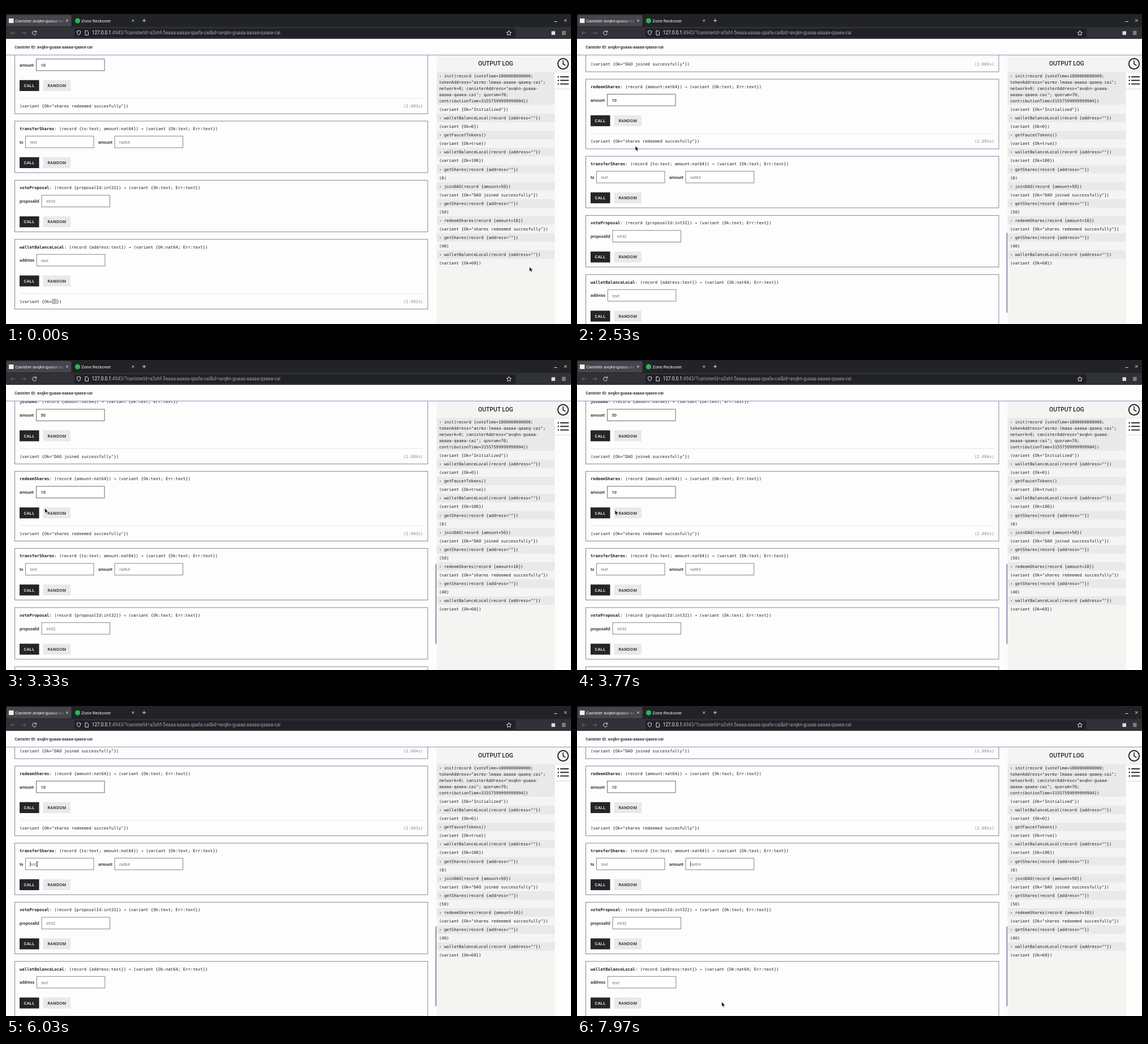
Animation of 998 by 561 pixels, one loop 8 s. Source, as an HTML page:

```html
<!DOCTYPE html>
<html lang="en">
<head>
<meta charset="utf-8">
<title>Canister console</title>
<style>
html, body { margin: 0; width: 998px; height: 561px; overflow: hidden; background: #fdfdfc; }
svg { display: block; }
text { font: 7.28px Roboto, sans-serif; fill: #222; white-space: pre; }
.m { font-family: "DejaVu Sans Mono", monospace; }
.b { font-weight: 500; }
.caps { font-weight: 500; letter-spacing: .36px; text-anchor: middle; }
.tab { font-size: 7.8px; fill: #f4f4f8; }
.url { font-size: 8.2px; fill: #a2a2aa; }
.hint { fill: #757575; }
.time { fill: #8a8a8a; text-anchor: end; }
.icon { fill: none; stroke: #e6e6ec; stroke-width: 1; }
</style>
</head>
<body>
<svg id="stage" width="998" height="561" viewBox="0 0 998 561"></svg>
<script>
const rect = (x, y, w, h, fill, extra = '') =>
  `<rect x="${x}" y="${y}" width="${w}" height="${h}" fill="${fill}" ${extra}/>`;
// Text is placed by its vertical middle.
const text = (x, mid, s, cls = '', extra = '') =>
  `<text x="${x}" y="${mid + 2.6}" class="${cls}" ${extra}>${s}</text>`;
const icon = (d, extra = '') => `<path class="icon" d="${d}" ${extra}/>`;

function card(top, name, args, result, fields, reply, time) {
  let s = rect(15.5, top, 729.5, reply ? 123 : 91, '#fdfdfd', 'stroke="#8585a0"');
  s += text(24, top + 13.3, `<tspan font-weight="700">${name}</tspan>: (record {${args}}) → (variant {${result}; Err:text})`, 'm');
  for (const [labelX, label, x, value] of fields) {
    const typed = value === '10' || value === '50';
    s += text(labelX, top + 37, label, 'b');
    s += rect(x, top + 26.5, 120.5, 20.5, '#fff', `stroke="${typed ? '#6c6c6c' : '#85858f'}"`);
    s += text(x + 8, top + 37.2, value, typed ? 'b' : 'hint');
  }
  s += rect(24, top + 63.7, 34.5, 19.3, '#252528') + text(41, top + 73.4, 'CALL', 'caps', 'style="fill:#fff"');
  s += rect(65.5, top + 63.7, 48.5, 19.3, '#e9e9e9') + text(89.8, top + 73.4, 'RANDOM', 'caps');
  if (reply) {
    s += rect(24, top + 95.6, 713, .7, '#dcdce4');
    s += text(24, top + 109.4, `(variant {Ok=${reply}})`, 'm') + text(737, top + 109.4, `(${time}s)`, 'm time');
  }
  return s;
}

const cards =
  card(-69, 'joinDAO', 'amount:nat64', 'Ok:text', [[24, 'amount', 53.5, '50']], '"DAO joined successfully"', '2.084') +
  card(67, 'redeemShares', 'amount:nat64', 'Ok:text', [[24, 'amount', 53.5, '10']], '"shares redeemed succesfully"', '2.083') +
  card(203, 'transferShares', 'to:text; amount:nat64', 'Ok:text', [[24, 'to', 34.5, 'text'], [163, 'amount', 192, 'nat64']]) +
  card(307.4, 'voteProposal', 'proposalId:int32', 'Ok:text', [[24, 'proposalId', 63, 'int32']]) +
  card(411.7, 'walletBalanceLocal', 'address:text', 'Ok:nat64', [[24, 'address', 54.3, 'text']], '  ', '2.092') +
  rect(81, 516.8, 8.8, 8.8, '#a9a9a9') + text(80.9, 521.1, '60', 'm', 'style="fill:#e6e6e6"');

const init = ['› init(record {voteTime=1800000000000;', 'tokenAddress="asrmz-lmaaa-aaaaa-qaaeq-cai";',
  'network=0; canisterAddress="avqkn-guaaa-', 'aaaaa-qaaea-cai"; quorum=70;', 'contributionTime=31557599999999904})'];
const balance = 'walletBalanceLocal(record {address=""})', shares = 'getShares(record {address=""})';
const log = ['(variant {Ok="Initialized"})', balance, '(variant {Ok=0})', 'getFaucetTokens()', '(variant {Ok=true})',
  balance, '(variant {Ok=100})', shares, '(0)', 'joinDAO(record {amount=50})', '(variant {Ok="DAO joined successfully"})',
  shares, '(50)', 'redeemShares(record {amount=10})', '(variant {Ok="shares redeemed succesfully"})',
  shares, '(40)', balance, '(variant {Ok=60})'];

const panel = rect(760.5, 87, 209.5, 474, '#f4f4f3') + rect(970, 87, 28, 474, '#fdfdfc') +
  rect(970, 87, 28, 29.5, '#f4f4f3') +
  text(865, 102.8, 'OUTPUT LOG', 'b', 'text-anchor="middle" style="font-size:10.4px"') +
  rect(761, 116.5, 208, 57.5, '#e9e9e9') +
  init.map((s, i) => text(765, 123.8 + i * 10.9, s, 'm')).join('') +
  log.map((s, i) => {
    const y = 182.5 + i * 15.06;
    return i % 2 ? rect(761, y - 7.5, 208, 15, '#e9e9e9') + text(765, y, '› ' + s, 'm') : text(765, y, s, 'm');
  }).join('') +
  rect(970, 116.5, 28, .8, '#deded0') + rect(970, 146, 28, .8, '#d6d6b8') +
  '<circle cx="984" cy="102" r="9.2" fill="none" stroke="#222" stroke-width="1.9"/>' +
  '<path d="M984 96v6.2l4.2 2.6" fill="none" stroke="#222" stroke-width="1.6"/>' +
  [125, 131.3, 137.6].map(y => rect(974.5, y - 1, 2.3, 2.1, '#222') + rect(979, y - 1, 15, 1.9, '#222')).join('');

const cross = (x, y, r) => icon(`M${x - r} ${y - r}l${2 * r} ${2 * r}m0 ${-2 * r}l${-2 * r} ${2 * r}`);
const dim = 'style="stroke:#6b6b73"';
const chrome = rect(0, 58, 998, 28, '#fdfdfd') + rect(0, 86, 998, 1, '#9292c4') +
  text(15.3, 72.6, 'Canister ID: avqkn-guaaa-aaaaa-qaaea-cai', 'b') +
  rect(0, 0, 998, 14, '#000') + rect(0, 14, 998, 23.5, '#222327') + rect(0, 37, 998, 21, '#313237') +
  rect(1, 16, 114.5, 20, '#45454c', 'rx="2"') +
  rect(5, 22, 8.5, 8, '#f0f0ea') + text(16.3, 26, 'Canister avqkn-guaaa-aa', 'tab', 'style="fill:url(#fade)"') +
  '<circle cx="126.5" cy="26" r="4.5" fill="#32b35a"/>' + text(133.3, 26, 'Zone Reckoner', 'tab') +
  cross(108, 25.7, 1.8) + cross(224.3, 25.7, 1.8) + cross(988.2, 25.5, 2.2) +
  icon('M241 25.7h6m-3-3v6M968.5 27.5h5') +
  icon('M16 47.5h-7.5m3-3l-3 3l3 3M27.5 47.5h7.5m-3-3l3 3l-3 3', dim) +
  icon('M53 45.4a3.5 3.5 0 1 0 .5 3.2M53.6 43.5v2.6h-2.8') +
  rect(121, 39.5, 779, 16, '#202126', 'rx="2"') +
  icon('M128.5 43.3l3.3 1.2q0 5-3.3 7q-3.3-2-3.3-7z') +
  icon('M140 43.7h3.4l2 2v5.6h-5.4z') +
  text(151.8, 47.5, '<tspan fill="#f8f8fb">127.0.0.1</tspan>:4943/?canisterId=a3shf-5eaaa-aaaaa-qaafa-cai&amp;id=avqkn-guaaa-aaaaa-qaaea-cai', 'url') +
  icon('M888.3 43.3l1.3 2.8 3 .4-2.2 2.1.5 3-2.6-1.5-2.6 1.5.5-3-2.2-2.1 3-.4z') +
  rect(963.5, 44.5, 6.5, 6.5, '#dcdce2') +
  icon('M982 45h6.5m-6.5 2.5h6.5m-6.5 2.5h6.5');

stage.innerHTML = `
  <linearGradient id="fade" gradientUnits="userSpaceOnUse" x1="76" x2="104">
    <stop stop-color="#f4f4f8"/><stop offset="1" stop-color="#f4f4f8" stop-opacity=".1"/></linearGradient>
  ${rect(0, 58, 998, 503, '#fdfdfc')}
  <g id="page">${cards}
    ${rect(42.5, 235.5, .8, 9, '#222', 'id="caretTo"')}${rect(200, 235.5, .8, 9, '#222', 'id="caretAmount"')}</g>
  ${panel}${rect(758.4, 420, 2, 141, '#8d8db2', 'id="thumb" rx="1"')}${chrome}
  <path id="arrow" d="M0 0v8.6l2-1.8 1.4 3 1.5-.7-1.4-2.9h2.7z" fill="#111" stroke="#fff" stroke-width=".6"/>
  <path id="beam" d="M-2-4.2q1.6 0 2 .8q.4-.8 2-.8M0-3.4v6.8M-2 4.2q1.6 0 2-.8q.4.8 2 .8" fill="none" stroke="#222" stroke-width=".9"/>`;

const scrollKeys = [[0, 0], [2200, 0], [2700, 84.5], [2780, 84.5], [3250, 143.5], [3850, 143.5], [4450, 53]];
const pointerKeys = [[0, 924.5, 460], [30, 924.5, 460], [330, 612, 560], [1370, 612, 560], [2000, 112, 240],
  [2700, 101.5, 248], [3300, 68.5, 275.5], [3850, 67, 279], [4450, 57, 268], [4700, 57, 268], [5450, 58, 284],
  [5700, 57, 300], [5950, 55, 293], [6370, 55, 293], [6900, 249, 300], [7200, 249, 298], [7800, 255.5, 536]];

// Eased value between the two keys around t.
function at(keys, t) {
  const i = keys.findIndex(k => k[0] > t);
  if (i < 0) return keys[keys.length - 1].slice(1);
  const a = keys[i - 1], b = keys[i], u = (t - a[0]) / (b[0] - a[0]), e = u * u * (3 - 2 * u);
  return a.slice(1).map((v, j) => v + (b[j + 1] - v) * e);
}
const show = (el, on) => el.setAttribute('visibility', on ? 'visible' : 'hidden');
const blink = (t, from, to) => t >= from && t < to && (t - from) % 1000 < 500;

function draw(now) {
  const t = now % 8000, [dy] = at(scrollKeys, t), [x, y] = at(pointerKeys, t);
  page.setAttribute('transform', `translate(0 ${dy})`);
  thumb.setAttribute('y', 420 - dy * .32);
  show(thumb, t > 2200);
  show(caretTo, blink(t, 5940, 6950));
  show(caretAmount, blink(t, 6950, 8000));
  const typing = t > 4350 && t < 7330;
  for (const el of [arrow, beam]) el.setAttribute('transform', `translate(${x} ${y})`);
  show(arrow, !typing);
  show(beam, typing);
  requestAnimationFrame(draw);
}
draw(performance.now());
</script>
</body>
</html>
```
